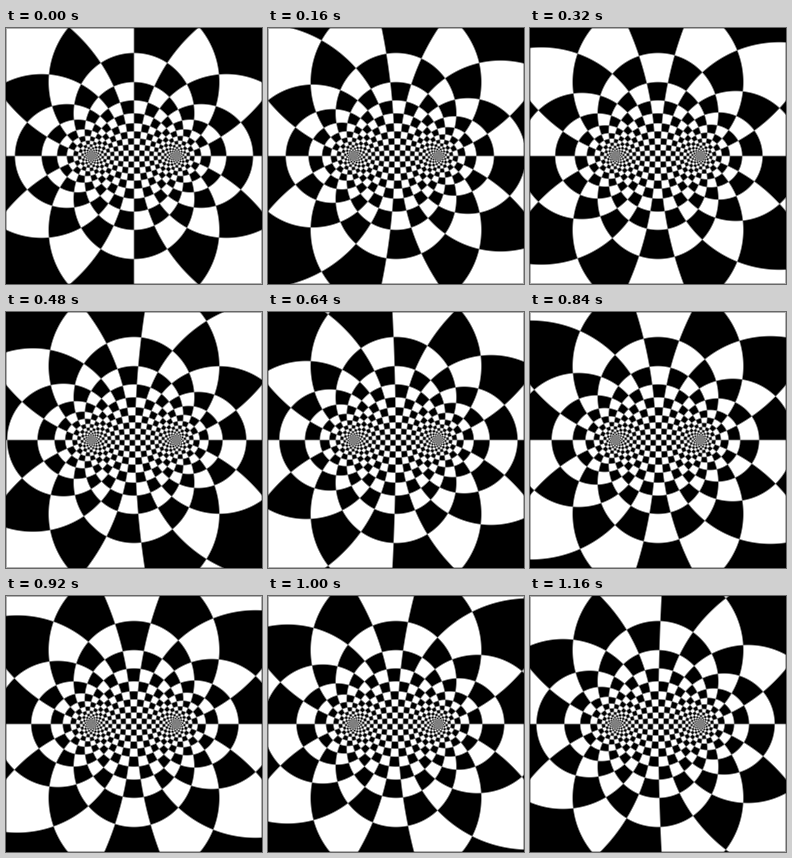
These frames come from a looping animation (256x256 px, 1.2 s). An HTML page with a canvas:

```html
<!DOCTYPE html>
<html lang="en">
<head>
<meta charset="utf-8">
<title>Bipolar checkerboard</title>
<style>
  html, body { margin: 0; width: 100%; height: 100%; overflow: hidden; background: #fff; }
  canvas { display: block; width: 100vw; height: 100vh; }
</style>
</head>
<body>
<canvas id="stage" width="256" height="256"></canvas>
<script>
const SIZE = 256;
const POLE = SIZE / 6;             // distance of each pole from the centre
const SIGMA_STEP = 0.25;           // cell size along the flow between the poles
const TAU_STEP = Math.PI / 12;     // 24 sectors around each pole
const SOFTNESS = 1.6;              // edge filter width in pixels
const LOOP = 1200, STEP = 40;
const STEPS = LOOP / STEP;

const ctx = document.getElementById('stage').getContext('2d');
const image = ctx.createImageData(SIZE, SIZE);
const pixels = new Uint32Array(image.data.buffer);

// Integral of a square wave that is +1 on even cells and -1 on odd ones
function ramp(u) {
  const t = u - 2 * Math.floor(u / 2);
  return t < 1 ? t : 2 - t;
}

// Mean of that square wave over a window around u
function softWave(u, width) {
  return (ramp(u + width / 2) - ramp(u - width / 2)) / width;
}

// Bipolar coordinates of every pixel, measured in cells
const sigma = new Float64Array(SIZE * SIZE);
const sigmaWidth = new Float64Array(SIZE * SIZE);
const tauWave = new Float64Array(SIZE * SIZE);
for (let i = 0; i < sigma.length; i++) {
  const x = i % SIZE + 0.5 - SIZE / 2;
  const y = SIZE / 2 - Math.floor(i / SIZE) - 0.5;
  const right = x - POLE, left = x + POLE;
  const toRight = Math.hypot(right, y), toLeft = Math.hypot(left, y);
  const width = SOFTNESS * 2 * POLE / (toRight * toLeft);
  const angle = Math.atan2(y, right) - Math.atan2(y, left);
  sigma[i] = Math.log(toRight / toLeft) / SIGMA_STEP;
  sigmaWidth[i] = width / SIGMA_STEP;
  tauWave[i] = softWave(angle / TAU_STEP, width / TAU_STEP);
}

function draw(step) {
  const shift = 2 * step / STEPS;  // two cells per loop
  for (let i = 0; i < pixels.length; i++) {
    const wave = softWave(sigma[i] - shift, sigmaWidth[i]) * tauWave[i];
    const grey = Math.round(127.5 + 127.5 * wave);
    pixels[i] = 0xff000000 | grey * 0x010101;
  }
  ctx.putImageData(image, 0, 0);
  ctx.strokeStyle = 'rgba(0, 0, 0, 0.3)';
  ctx.strokeRect(0.5, 0.5, SIZE - 1, SIZE - 1);
}

const start = performance.now();
let shown = 0;
draw(shown);

function tick() {
  const step = Math.floor((performance.now() - start) % LOOP / STEP);
  if (step !== shown) draw(shown = step);
  requestAnimationFrame(tick);
}
requestAnimationFrame(tick);
</script>
</body>
</html>
```
